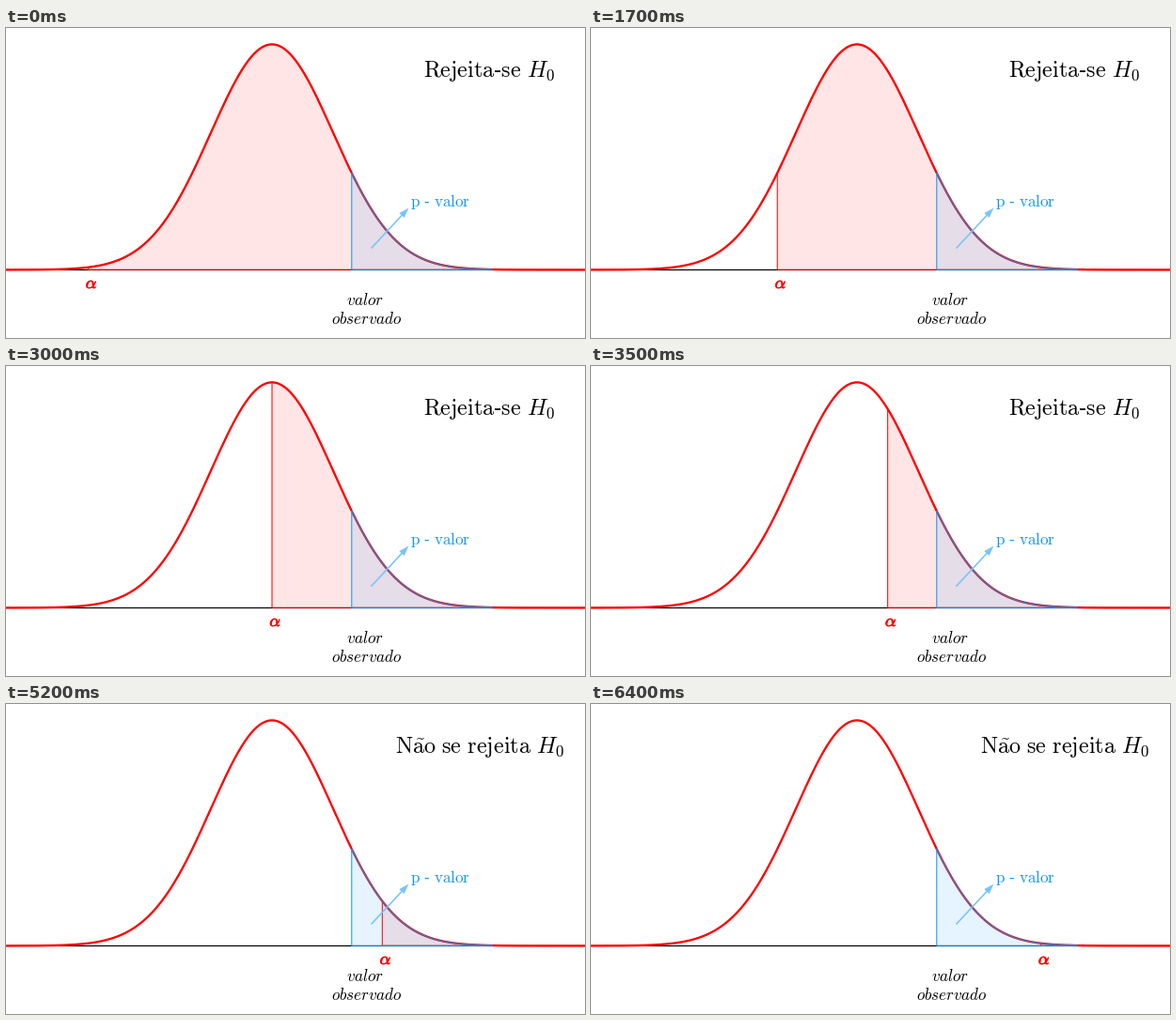
Animation of 616x330 px, one loop 8.4 s. Source, as a matplotlib script:

```python
import numpy as np
import matplotlib.pyplot as plt
from matplotlib.animation import FuncAnimation
from matplotlib.colors import to_rgba
from matplotlib.patches import Polygon
from matplotlib.patheffects import withStroke

W, H, DPI = 616, 330, 100
PT = 72 / DPI                      # points per pixel
MU, SIGMA = 283, 65.2
BASE, PEAK = 257.4, 240
Z_OBS, Z_END = 1.3, 3.6
FRAMES, STEP_MS = 84, 100
PAUSE_AT, PAUSE = 43, 4            # rest while alpha meets the observed value
RED, BLUE, SKY = "#ff0000", "#0d96f2", "#78c4fb"

plt.rcParams["mathtext.fontset"] = "cm"

REJECT = r"$\mathrm{Rejeita‐se}\ H_0$"
KEEP = r"$\mathrm{N\tilde{a}o}\ \mathrm{se}\ \mathrm{rejeita}\ H_0$"


def to_x(z):
    return MU + SIGMA * z


def bell(x):
    return BASE - PEAK * np.exp(-((x - MU) / SIGMA) ** 2 / 2)


def tail(z):
    """Outline of the area under the curve to the right of z."""
    x = np.linspace(to_x(z), to_x(Z_END), 240)
    top = np.column_stack([x, bell(x)])
    return np.vstack([[x[0], BASE], top, [x[-1], BASE]])


def area(z, fill, line, order):
    patch = Polygon(tail(z), closed=True, fc=to_rgba(fill, 0.1),
                    ec=to_rgba(line, 0.85), lw=1.2 * PT, zorder=order,
                    joinstyle="miter", snap=False)
    return ax.add_patch(patch)


def label(x, y, text, size, color="black", ha="left", **kw):
    return ax.text(x, y, text, fontsize=size * PT, color=color, ha=ha,
                   va="baseline", zorder=6, **kw)


def arrow(start, tip, length=11, half=3.6):
    start, tip = np.array(start), np.array(tip)
    along = (tip - start) / np.hypot(*(tip - start))
    side = np.array([-along[1], along[0]])
    neck = tip - length * along
    ax.plot(*zip(start, neck), color=SKY, lw=1.6 * PT, zorder=5)
    ax.add_patch(Polygon([tip, neck + half * side, neck - half * side],
                         fc=SKY, ec="none", zorder=5))


fig = plt.figure(figsize=(W / DPI, H / DPI), dpi=DPI, facecolor="white")
ax = fig.add_axes([0, 0, 1, 1])
ax.set(xlim=(0, W), ylim=(H, 0))
ax.axis("off")

xs = np.linspace(-5, W + 5, 800)
ax.plot([0, W], [BASE, BASE], color="black", lw=1.2 * PT, zorder=1)
ax.plot(xs, bell(xs), color=RED, lw=2.3 * PT, zorder=2)
alpha_area = area(-3, RED, RED, 3)
area(Z_OBS, "#0099ff", BLUE, 4)
arrow((389, 234), (428.5, 191.5))

label(430.5, 190, r"$\mathrm{p}\ \mathrm{‐}\ \mathrm{valor}$", 17.1, BLUE)
label(382.5, 295, "$valor$", 17.2, ha="center")
label(383.5, 315, "$observado$", 17.2, ha="center")
title = label(443.5, 52, REJECT, 24.2)
alpha = label(0, 277, r"$\alpha$", 18, RED, "center",
              path_effects=[withStroke(linewidth=0.8 * PT, foreground=RED)])


def update(i):
    step = min(i, PAUSE_AT) + max(0, i - PAUSE_AT - PAUSE)
    step = min(step, 60)
    z = -3 + step / 10
    alpha_area.set_xy(tail(z))
    alpha.set_x(to_x(z) + 3.7)
    rejected = step <= PAUSE_AT
    title.set_text(REJECT if rejected else KEEP)
    title.set_x(443.5 if rejected else 414.5)
    return alpha_area, alpha, title


anim = FuncAnimation(fig, update, frames=FRAMES, interval=STEP_MS,
                     repeat=True, repeat_delay=0, blit=False)
plt.show()
```
